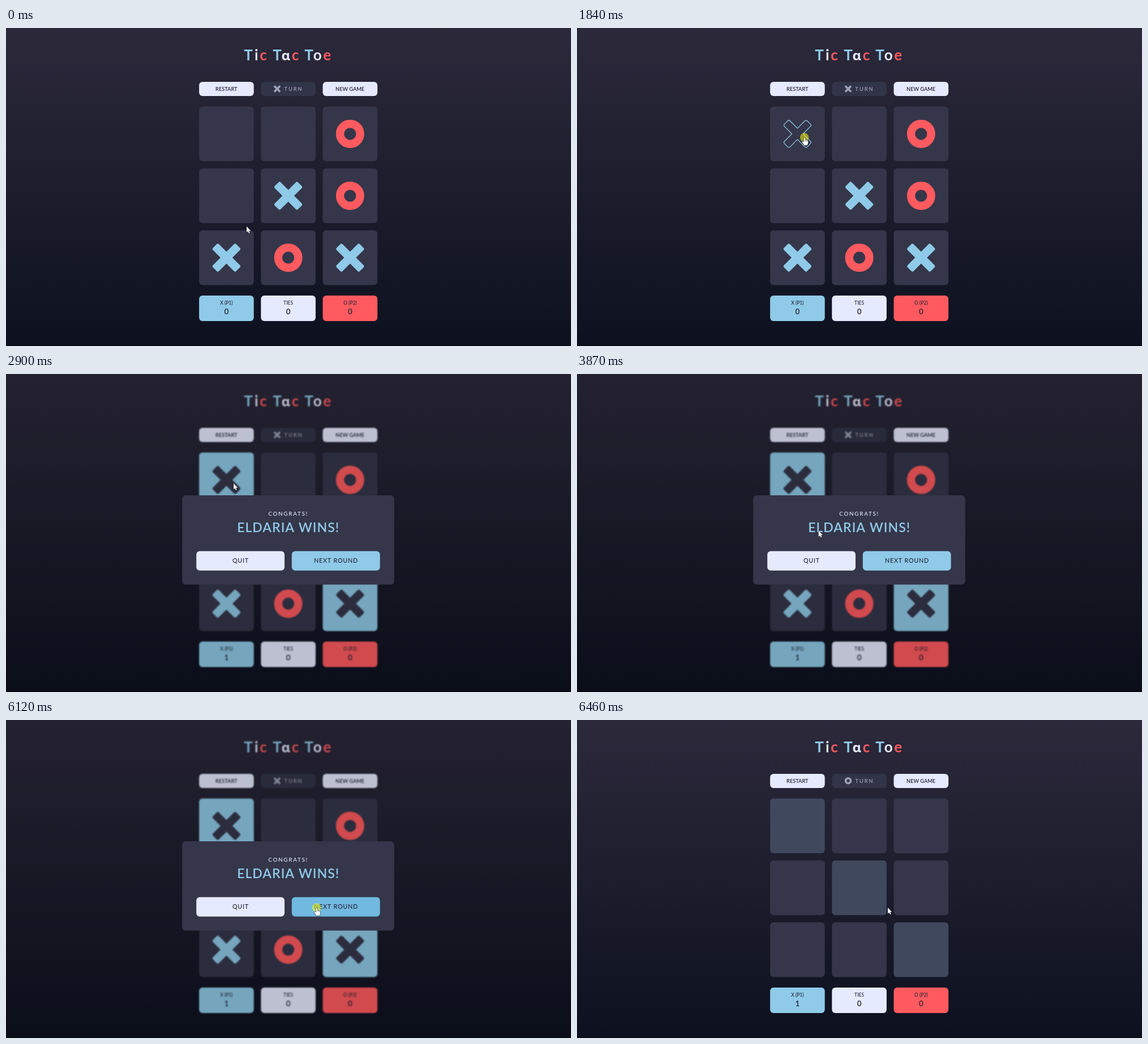
An HTML page with a canvas for the animation above (7070 ms loop, 998 by 561 pixels).

```html
<!DOCTYPE html>
<html lang="en">
<head>
<meta charset="utf-8">
<title>Tic Tac Toe</title>
<style>
html, body { margin: 0; width: 100%; height: 100%; overflow: hidden; background: #1c1b2a; }
canvas { display: block; width: 998px; height: 561px; }
</style>
</head>
<body>
<canvas id="stage" width="998" height="561"></canvas>
<script>
const W = 998, H = 561, LOOP = 7070;
const BLUE = '#8fcae8', RED = '#ff5a5f', PALE = '#e6eaff', CELL = '#35364a', INK = '#232336';
const SIZE = 96.6, PITCH = 109.2, LEFT = 341.1, TOP = 138.5;

// Moments at which the state of the game changes
const PRESS = 1840, WIN = 1900, MODAL = 2870, PRESS_NEXT = 6120, NEXT = 6220;

const view = document.getElementById('stage').getContext('2d');
const layer = document.createElement('canvas');
layer.width = W;
layer.height = H;
const board = layer.getContext('2d');

const clamp = v => Math.min(1, Math.max(0, v));
const ramp = (t, a, b) => clamp((t - a) / (b - a));
const linear = u => u;
const easeIn = u => Math.pow(u, 1.2);
const easeOut = u => 1 - Math.pow(1 - u, 1.6);
const smooth = u => u * u * (3 - 2 * u);

function mix(a, b, k) {
  const part = (c, i) => parseInt(c.slice(i, i + 2), 16);
  return 'rgb(' + [1, 3, 5].map(i => Math.round(part(a, i) + (part(b, i) - part(a, i)) * k)) + ')';
}

// Pointer moves: start, end, x, y, easing
const MOVES = [
  [30, 730, 406, 234.5, easeIn],
  [770, 1010, 402, 193, easeOut],
  [3470, 4150, 441, 325, smooth],
  [4200, 4630, 461.5, 334, easeIn],
  [4630, 4900, 514, 333, linear],
  [4940, 5180, 549, 331, easeOut]
];

function pointerAt(t) {
  let x = 425, y = 350;
  for (const [a, b, tx, ty, ease] of MOVES) {
    if (t < a) break;
    const k = ease(ramp(t, a, b));
    x += (tx - x) * k;
    y += (ty - y) * k;
  }
  return { x, y };
}

function box(c, x, y, w, h, r, fill) {
  c.beginPath();
  c.roundRect(x, y, w, h, r);
  c.fillStyle = fill;
  c.fill();
}

function text(c, str, x, y, size, color, weight = 500, gap = 0, family = 'Lato') {
  c.font = `${weight} ${size}px ${family}, "Open Sans", sans-serif`;
  c.letterSpacing = gap + 'px';
  c.textAlign = 'center';
  c.textBaseline = 'alphabetic';
  c.fillStyle = color;
  c.fillText(str, x, y + size * 0.36);
}

function cross(c, x, y, k, color) {
  c.save();
  c.translate(x, y);
  c.rotate(Math.PI / 4);
  c.scale(k, k);
  c.beginPath();
  c.roundRect(-29, -7.4, 58, 14.8, 3);
  c.roundRect(-7.4, -29, 14.8, 58, 3);
  c.fillStyle = color;
  c.fill();
  c.restore();
}

function crossOutline(c, x, y) {
  const a = 7, b = 28.4, r = 2.8;
  const pts = [[a, -a], [a, -b], [-a, -b], [-a, -a], [-b, -a], [-b, a],
    [-a, a], [-a, b], [a, b], [a, a], [b, a], [b, -a]];
  c.save();
  c.translate(x, y);
  c.rotate(Math.PI / 4);
  c.beginPath();
  c.moveTo(a, -12);
  for (let i = 1; i <= 12; i++) {
    const p = pts[i % 12], q = pts[(i + 1) % 12];
    const inner = Math.abs(p[0]) === Math.abs(p[1]);
    c.arcTo(p[0], p[1], q[0], q[1], inner ? 0 : r);
  }
  c.closePath();
  c.strokeStyle = BLUE;
  c.lineWidth = 1.2;
  c.stroke();
  c.restore();
}

function ring(c, x, y, k, color) {
  c.beginPath();
  c.arc(x, y, 17.8 * k, 0, Math.PI * 2);
  c.strokeStyle = color;
  c.lineWidth = 14.4 * k;
  c.stroke();
}

function drawTitle(c) {
  const colors = [BLUE, PALE, RED];
  const centers = [428, 442.3, 454.5, 479, 494, 511, 535, 550.3, 567.3];
  [...'TicTɑcToe'].forEach((ch, i) => {
    const round = ch === 'ɑ';
    text(c, ch, centers[i], round ? 48.6 : 47.8, round ? 24 : 26, colors[i % 3], 700, 0,
      round ? '"Noto Sans"' : 'Lato');
  });
}

function drawHeader(c, t) {
  const mid = LEFT + PITCH, soft = '#9fa3b8';
  box(c, LEFT, 95, SIZE, 25, 6, PALE);
  box(c, mid, 95, SIZE, 25, 6, '#323447');
  box(c, LEFT + 2 * PITCH, 95, SIZE, 25, 6, PALE);
  text(c, 'RESTART', 389.3, 107.5, 9.2, INK, 600);
  text(c, 'NEW GAME', 607.6, 107.5, 9.2, INK, 600);
  if (t < NEXT) cross(c, 479, 107.4, 0.25, soft);
  else ring(c, 479, 107.2, 0.25, soft);
  text(c, 'TURN', 508, 107.5, 9.2, soft, 600, 2);
}

function drawScores(c, t) {
  const items = [['X (P1)', t < WIN ? 0 : 1, BLUE], ['TIES', 0, PALE], ['O (P2)', 0, RED]];
  items.forEach(([label, score, color], i) => {
    const x = LEFT + i * PITCH;
    box(c, x, 472, SIZE, 45, 6, color);
    text(c, label, x + SIZE / 2, 485.2, 8.5, INK, 500);
    text(c, String(score), x + SIZE / 2, 499.8, 13.4, INK, 600);
  });
}

function cellUnder(p) {
  const col = Math.floor((p.x - LEFT) / PITCH), row = Math.floor((p.y - TOP) / PITCH);
  const inside = p.x - LEFT - col * PITCH < SIZE && p.y - TOP - row * PITCH < 95.8;
  return inside ? row * 3 + col : -1;
}

function drawCells(c, t, p) {
  const marks = t < NEXT ? '..O.XOXOX' : '.........';
  const hot = t < WIN ? cellUnder(p) : -1;
  const glow = t < NEXT ? ramp(t, 1935, 2130) : 1 - 0.88 * ramp(t, NEXT, 6460);
  for (let i = 0; i < 9; i++) {
    const x = LEFT + (i % 3) * PITCH, y = TOP + Math.floor(i / 3) * PITCH;
    const cx = x + SIZE / 2, cy = y + SIZE / 2;
    const wins = i % 4 === 0 && t >= WIN;
    box(c, x, y, SIZE, SIZE, 6, wins ? mix(CELL, BLUE, glow) : CELL);
    const mark = i === 0 && t >= WIN && t < NEXT ? 'X' : marks[i];
    if (mark === 'X') cross(c, cx, cy, 1, wins && t >= 1935 ? CELL : BLUE);
    else if (mark === 'O') ring(c, cx, cy, 1, RED);
    else if (i === hot) crossOutline(c, cx, cy);
  }
}

function drawModal(c, t) {
  const quit = ramp(t, 4020, 4320) - ramp(t, 4787, 5087);
  const next = ramp(t, 4855, 5155);
  box(c, 311.2, 214, 374.4, 157.5, 6, CELL);
  text(c, 'CONGRATS!', 498.6, 246.2, 9.9, PALE, 500, 1.7);
  text(c, 'ELDARIA WINS!', 498.6, 270.8, 23, BLUE, 600, 1);
  box(c, 336.2, 312.4, 155.8, 34.4, 6, mix(PALE, '#c3cfff', quit));
  box(c, 504.8, 312.4, 155.8, 34.4, 6, mix(BLUE, '#71b9e0', next));
  text(c, 'QUIT', 414.4, 329.6, 10.7, INK, 500, 0.8);
  text(c, 'NEXT ROUND', 583, 329.6, 10.7, INK, 500, 0.8);
}

function drawBackdrop(c) {
  const g = c.createLinearGradient(0, 0, 0, H);
  g.addColorStop(0, '#2c293b');
  g.addColorStop(1, '#0d111f');
  c.fillStyle = g;
  c.fillRect(0, 0, W, H);
}

const ARROW = new Path2D('M0 0V10.6L2.4 8.4 4 12 5.7 11.3 4.1 7.7H7.3Z');
const HAND = new Path2D('M-1.2 .9Q0 -.4 1.2 .9V4.4Q2.4 3.8 3 5Q4.2 4.4 4.7 5.6Q6 5.2 6.2 6.8V9.6' +
  'Q6 11.6 5 12.6V14H-1.4V12.8L-4.4 8.6Q-4.8 7 -3.2 7L-1.2 8.6Z');

function drawPointer(c, p, hand) {
  c.save();
  c.translate(p.x, p.y);
  c.lineJoin = 'round';
  c.lineWidth = 1;
  c.strokeStyle = '#15151f';
  c.stroke(hand ? HAND : ARROW);
  c.fillStyle = '#fff';
  c.fill(hand ? HAND : ARROW);
  if (hand) {
    c.lineWidth = 0.5;
    c.stroke(new Path2D('M1.2 4.4V7M3 5V7.2M4.7 5.6V7.4'));
  }
  c.restore();
}

function isHand(t, p) {
  if (t >= NEXT) return false;
  if (t < MODAL) return cellUnder(p) >= 0;
  if (t < MODAL + 30) return true;
  const onButton = p.x > 336 && p.x < 660 && (p.x < 492 || p.x > 505);
  return onButton && p.y > 312 && p.y < 347;
}

function draw(t) {
  const p = pointerAt(t);
  const open = t >= MODAL && t < NEXT;

  board.clearRect(0, 0, W, H);
  drawTitle(board);
  drawHeader(board, t);
  drawCells(board, t, p);
  drawScores(board, t);

  drawBackdrop(view);
  view.filter = open ? 'blur(1px)' : 'none';
  view.drawImage(layer, 0, 0);
  view.filter = 'none';
  if (open) {
    view.fillStyle = 'rgba(0, 0, 0, 0.18)';
    view.fillRect(0, 0, W, H);
    drawModal(view, t);
  }
  view.fillStyle = 'rgba(0, 0, 0, 0.5)';
  view.fillRect(0, H - 1, W, 1);

  if ((t >= PRESS && t < WIN) || (t >= PRESS_NEXT && t < NEXT)) {
    view.beginPath();
    view.arc(p.x - 0.3, p.y, 7.8, 0, Math.PI * 2);
    view.fillStyle = 'rgba(255, 255, 0, 0.53)';
    view.fill();
  }
  drawPointer(view, p, isHand(t, p));
}

const begin = performance.now();
function tick() {
  draw((performance.now() - begin) % LOOP);
  requestAnimationFrame(tick);
}
tick();
</script>
</body>
</html>
```
